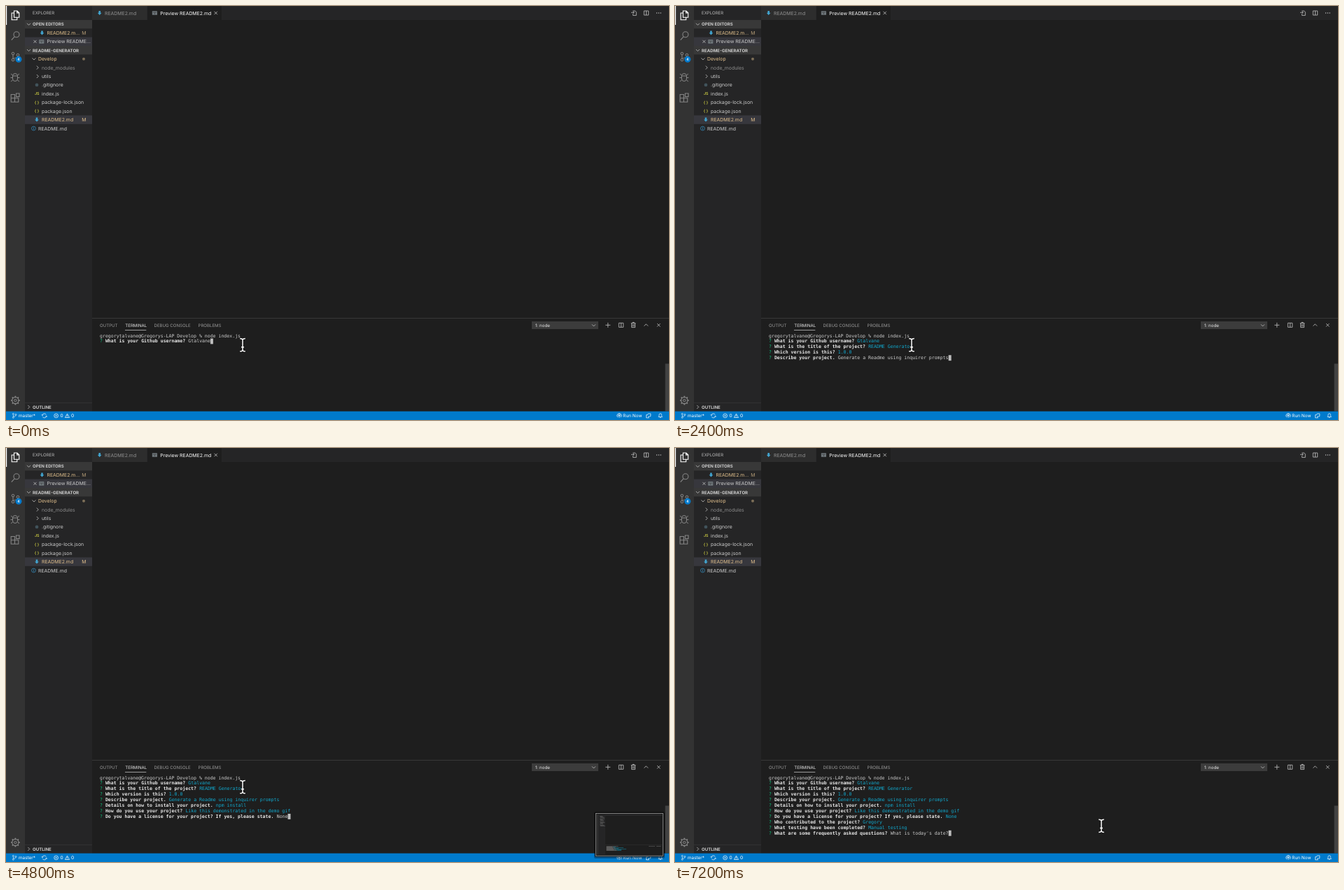
Write an HTML page that moves like this. It is 947x592 px and loops after 8 s.

```html
<!DOCTYPE html>
<html lang="en">
<head>
<meta charset="utf-8">
<title>README generator in a terminal</title>
<style>
html, body { margin: 0; width: 100%; height: 100%; overflow: hidden; background: #1e1e1e; }
svg { display: block; width: 947px; height: 592px; }
text { font-family: Inter, "Liberation Sans", sans-serif; text-rendering: geometricPrecision; }
.term text { font-family: "DejaVu Sans Mono", "Liberation Mono", monospace; font-size: 6.56px; }
.i { fill: none; stroke-width: 1; }
</style>
</head>
<body>
<svg id="stage" viewBox="0 0 947 592" xmlns="http://www.w3.org/2000/svg"></svg>
<script>
const STEP = 800, COL = 3.949, ROW = 7.93, LEFT = 134, TOP = 473.5;
const GREEN = '#0dbc79', CYAN = '#11a8cd', LIGHT = '#cccccc', GOLD = '#e2c08d', BLUE = '#3794c8';

const prompts = [
  ['What is your Github username?', 'Gtalvane'],
  ['What is the title of the project?', 'README Generator'],
  ['Which version is this?', '1.0.0'],
  ['Describe your project.', 'Generate a Readme using inquirer prompts'],
  ['Details on how to install your project.', 'npm install'],
  ['How do you use your project?', 'Like this demonstrated in the demo gif'],
  ['Do you have a license for your project? If yes, please state.', 'None'],
  ['Who contributed to the project?', 'Gregory'],
  ['What testing have been completed?', 'Manual testing'],
  ['What are some frequently asked questions?', "What is today's date?"]
];
const THUMB_STEP = 6, SPACE_STEP = 7, LAST = prompts.length - 1;

const rect = (x, y, w, h, fill, more = '') =>
  `<rect x="${x}" y="${y}" width="${w}" height="${h}" fill="${fill}" ${more}/>`;
const text = (x, y, s, fill = LIGHT, size = 6.9, more = '') =>
  `<text x="${x}" y="${y}" fill="${fill}" font-size="${size}" ${more}>${s}</text>`;
const caps = (x, y, s, fill, weight = 400) => text(x, y, s, fill, 6.1, `font-weight="${weight}"`);
const line = (d, color = '#c5c5c5', w = 0.8) =>
  `<path class="i" d="${d}" stroke="${color}" style="stroke-width:${w}"/>`;
const ring = (x, y, r, color, w = 0.8) =>
  `<circle class="i" cx="${x}" cy="${y}" r="${r}" stroke="${color}" style="stroke-width:${w}"/>`;
const dot = (x, y, r, fill) => `<circle cx="${x}" cy="${y}" r="${r}" fill="${fill}"/>`;
const down = (x, y) => line(`M${x - 2.5} ${y - 1.2}l2.5 2.5l2.5-2.5`);
const right = (x, y) => line(`M${x - 1.2} ${y - 2.5}l2.5 2.5l-2.5 2.5`);
const cross = (x, y, r = 2.2) =>
  line(`M${x - r} ${y - r}l${2 * r} ${2 * r}M${x + r} ${y - r}l${-2 * r} ${2 * r}`);
const arrow = (x, y) =>
  `<path d="M${x - 1.3} ${y - 3}h2.6v2.8h1.6l-2.9 3.2l-2.9-3.2h1.6z" fill="#42a5d0"/>`;
const preview = (x, y) =>
  rect(x - 3.6, y - 2.8, 7.2, 5.6, '#6f777b', 'rx=".6"') + line(`M${x - 2.8} ${y - 0.8}h5.6M${x} ${y - 0.6}v2.6`, '#333', 0.6);
const split = (x, y) => line(`M${x - 3.2} ${y - 3}h6.4v6h-6.4zM${x} ${y - 3}v6`);

function activityBar() {
  const g = '#858585';
  let s = rect(0, 0, 27, 580, '#333333') + rect(0, 0, 1.2, 27, '#ffffff');
  s += line('M11.5 7h4.5l2.8 2.8v6.4h-7.3zM15.8 7v3h3M11.5 10H8.2v9.7h7.6v-3.3', '#fff', 1.1);
  s += ring(15, 40.8, 4, g, 1.1) + line('M12.2 43.8L7.8 48.6', g, 1.2);
  s += ring(10, 68, 1.8, g, 1) + ring(17, 70, 1.8, g, 1) + ring(10, 77, 1.8, g, 1) +
    line('M10 70v5M17 72c0 2.5-4 2-6.5 3', g, 1);
  s += dot(18, 76.3, 4.5, '#007acc') + text(18, 78.3, '4', '#fff', 5.2, 'text-anchor="middle" font-weight="600"');
  s += line('M9.5 100a3.5 3.5 0 0 1 7 0v4a3.5 3.5 0 0 1-7 0zM9.5 100h7M7 97l2.5 2M19 97l-2.5 2M6.5 102.5h3M16.5 102.5h3M7 108l2.8-2.4M19 108l-2.8-2.4', g, 1);
  s += line('M7.2 126.5h5.3v10.7H7.2zM7.2 131.8h10.6v5.4H12.5M14.5 125h4.6v4.6h-4.6z', g, 1.1);
  s += ring(13.4, 564, 4.6, g, 1.2) + ring(13.4, 564, 1.7, g, 1);
  for (let a = 0; a < 8; a++)
    s += `<path class="i" d="M13.4 559.6v-2" stroke="${g}" style="stroke-width:1.7" transform="rotate(${a * 45} 13.4 564)"/>`;
  return s;
}

function sideBar() {
  const y = n => 26 + n * 12.42;
  const label = (x, n, s, fill) => text(x, y(n) + 2.5, s, fill);
  let s = rect(27, 0, 96, 580, '#252526') + caps(38, 12.4, 'EXPLORER', '#bbbbbb');
  s += rect(27, 20, 96, 12.2, '#383838') + rect(27, 44.6, 96, 12.4, '#37373d') +
    rect(27, 57, 96, 12.3, '#383838') + rect(27, 156.4, 96, 12.4, '#37373d');
  s += down(32.5, 26) + caps(38, 28.3, 'OPEN EDITORS', LIGHT, 700);
  s += arrow(51.5, y(1)) + label(58.5, 1, 'README2.m...', GOLD) + label(108.3, 1, 'M', '#b69d77');
  s += cross(41.5, y(2), 2) + preview(50.8, y(2)) + label(58.5, 2, 'Preview README...');
  s += down(32.5, y(3)) + caps(38, y(3) + 2.3, 'README-GENERATOR', LIGHT, 700);
  s += down(40, y(4)) + label(46, 4, 'Develop', GOLD) + dot(111, y(4), 2, '#7d6f58');
  s += right(45, y(5)) + label(51, 5, 'node_modules', '#8c8c8c');
  s += right(45, y(6)) + label(51, 6, 'utils');
  s += dot(44, y(7), 2.4, '#41535b') + label(51, 7, '.gitignore');
  s += text(41, y(8) + 2, 'JS', '#cbcb41', 5.4, 'font-weight="600"') + label(51, 8, 'index.js');
  for (const [n, name] of [[9, 'package-lock.json'], [10, 'package.json']])
    s += text(44, y(n) + 2, '{ }', '#cbcb41', 5.6, 'text-anchor="middle" font-weight="600"') + label(51, n, name);
  s += arrow(44, y(11)) + label(51, 11, 'README2.md', GOLD) + label(108.3, 11, 'M', GOLD);
  s += ring(39.5, y(12), 2.9, BLUE, 0.7) + line(`M39.5 ${y(12) - 0.5}v2.1M39.5 ${y(12) - 1.8}v.8`, BLUE, 0.8);
  s += label(46, 12, 'README.md');
  s += rect(27, 567, 96, 0.6, '#3b3b3c') + right(32.5, 573.4) + caps(38, 575.7, 'OUTLINE', LIGHT, 700);
  return s;
}

function tabs() {
  let s = rect(123, 0, 824, 20, '#252526') + rect(123, 0, 78.6, 20, '#2d2d2d') + rect(202, 0, 106, 20, '#1e1e1e');
  s += arrow(133.7, 10) + text(141, 12.6, 'README2.md', '#919191');
  s += preview(212.4, 10) + text(220.3, 12.6, 'Preview README2.md', '#ffffff') + cross(299.7, 10);
  s += line('M895.5 7h3.2l1.6 1.8v4.6h-4.8v-2M893 9.3h4M895.6 7.7l1.7 1.6l-1.7 1.6') + split(914.5, 10);
  for (const x of [929.5, 932.3, 935.1]) s += dot(x, 10, 0.7, '#c5c5c5');
  return s;
}

function panel() {
  const tab = (x, s, fill = '#9a9a9a') => caps(x, 458.9, s, fill);
  let s = rect(123, 446, 824, 0.7, '#434343');
  s += tab(134, 'OUTPUT') + tab(170.3, 'TERMINAL', '#e7e7e7') + tab(211.5, 'DEBUG CONSOLE') + tab(274.5, 'PROBLEMS');
  s += rect(170, 463.2, 30.3, 0.7, '#d0d0d0');
  s += rect(751, 451, 95, 11, '#3c3c3c') + text(756, 458.9, '1: node', '#f0f0f0', 6.2) + down(839.5, 456.6);
  s += line('M856.3 456.3h7M859.8 452.8v7') + split(878.6, 456.3);
  s += line('M892.8 453.6h6.6M895 453.4v-1h2.2v1M893.6 453.8v5.8h5v-5.8M895.2 455v3.4M897 455v3.4');
  s += line('M911.5 457.6l2.8-2.8l2.8 2.8') + cross(932.3, 456.3);
  s += rect(941.6, 511.5, 5.4, 68, '#424242');
  return s;
}

function statusBar() {
  const w = '#ffffff';
  let s = rect(0, 579.6, 947, 12.4, '#007acc');
  s += ring(10.4, 583.4, 1, w, 0.6) + ring(10.4, 588.4, 1, w, 0.6) + ring(14, 584.4, 1, w, 0.6) +
    line('M10.4 584.4v3M14 585.4c0 1.5-2.4 1.2-3.2 2', w, 0.6);
  s += text(18, 588.3, 'master*', w, 6.4);
  s += line('M51.8 585.3a3 3 0 0 1 5.6-.8M57.8 586.5a3 3 0 0 1-5.6 .8M50.9 584.2l.9 1.4l1.4-.8M58.7 587.5l-.9-1.4l-1.4 .8', w, 0.7);
  s += ring(71.6, 585.9, 2.9, w, 0.7) + line('M70.4 584.7l2.4 2.4M72.8 584.7l-2.4 2.4', w, 0.7) + text(77.5, 588.3, '0', w, 6.6);
  s += line('M87.5 583l3.1 5.5h-6.2zM87.5 584.8v1.7M87.5 587.2v.6', w, 0.7) + text(93, 588.3, '0', w, 6.6);
  s += dot(876, 585.5, 0.9, w) + line('M876 586v3M874.6 587a2 2 0 1 1 2.8 0M873.9 588.3a3.3 3.3 0 1 1 4.2 0', w, 0.6);
  s += text(881.3, 588.3, 'Run Now', w, 6.4);
  s += line('M916.5 583h4.3v3.6h-1.8l-1.4 1.5v-1.5M917.2 584.6h-2.6v4.3h4.2', w, 0.7);
  s += line('M932 587.6c.9-.7 .8-2 .9-3a1.8 1.8 0 0 1 3.6 0c.1 1 0 2.3 .9 3zM934 588.5h1.4', w, 0.7);
  return s;
}

function thumbnail() {
  let s = rect(840, 520, 101, 67, '#000', 'opacity=".28" rx="2"') + rect(841.2, 521.2, 98.6, 63.4, '#080808', 'rx="1"');
  s += rect(842.6, 522.6, 95.8, 60.6, '#1e1e1e', 'stroke="#a0a0a0" stroke-width=".8"');
  s += rect(844, 524, 2.6, 57.5, '#333') + rect(846.6, 524, 9.4, 57.5, '#252526') + rect(856, 524, 81, 1.8, '#29292a');
  for (let n = 0; n < 12; n++)
    s += rect(848 + (n % 3) * 0.4, 526 + n * 1.3, 4 + (n * 5 % 4), 0.5, '#6f6f6f');
  s += rect(856, 567.5, 81, 0.3, '#444') + rect(857.5, 569, 17, 0.5, '#777') + rect(918, 569, 9, 0.9, '#4a4a4a') + rect(929, 569, 6.5, 0.5, '#777');
  for (let n = 0; n < 6; n++) {
    const w = 9 + n * 4 % 7;
    s += rect(857.5, 570.4 + n * 0.95, w, 0.5, '#999') + rect(858 + w, 570.4 + n * 0.95, 4 + n * 7 % 11, 0.5, '#128ba7');
  }
  return s;
}

function pointer() {
  const d = 'M-3.8-9C-1.4-9 0-8.4 0-6.6C0-8.4 1.4-9 3.8-9M0-6.6V6.8M-3.8 9.2C-1.4 9.2 0 8.6 0 6.8C0 8.6 1.4 9.2 3.8 9.2M-2 3.2H2';
  return line(d, '#111', 2.8) + line(d, '#fff', 1.5);
}

const mono = (col, row, s, fill, bold) =>
  text(LEFT + col * COL, TOP + row * ROW, s, fill, 6.56, bold ? 'font-weight="700"' : '');

function terminal(step) {
  let s = mono(0, 0, 'gregorytalvane@Gregorys-LAP Develop % node index.js', LIGHT);
  for (let n = 0; n <= step; n++) {
    const [ask, answer] = prompts[n], col = ask.length + 3, row = n + 1;
    s += mono(0, row, '?', GREEN) + mono(2, row, ask, '#e5e5e5', true);
    s += mono(col, row, answer, n < step ? CYAN : LIGHT);
    if (n === step) {
      const end = col + answer.length + (n === SPACE_STEP ? 1 : 0);
      s += rect(LEFT + end * COL, TOP + row * ROW - 6, COL, ROW, '#bdbdbd');
    }
  }
  return s;
}

const stage = document.getElementById('stage');
stage.innerHTML = rect(0, 0, 947, 592, '#1e1e1e') + activityBar() + sideBar() + tabs() + panel() + statusBar() +
  '<g class="term" id="term"></g>' + `<g id="thumb">${thumbnail()}</g><g id="mouse">${pointer()}</g>`;
const [term, thumb, mouse] = ['term', 'thumb', 'mouse'].map(id => document.getElementById(id));

let shown = -1;
function draw(ms) {
  const step = Math.floor(ms / STEP) % prompts.length;
  if (step === shown) return;
  shown = step;
  term.innerHTML = terminal(step);
  thumb.setAttribute('visibility', step === THUMB_STEP ? 'visible' : 'hidden');
  mouse.setAttribute('transform', step === LAST ? 'translate(609 540.3)' : 'translate(338 484.6)');
}

const start = performance.now();
function tick() {
  draw(performance.now() - start);
  requestAnimationFrame(tick);
}
draw(0);
requestAnimationFrame(tick);
</script>
</body>
</html>
```
